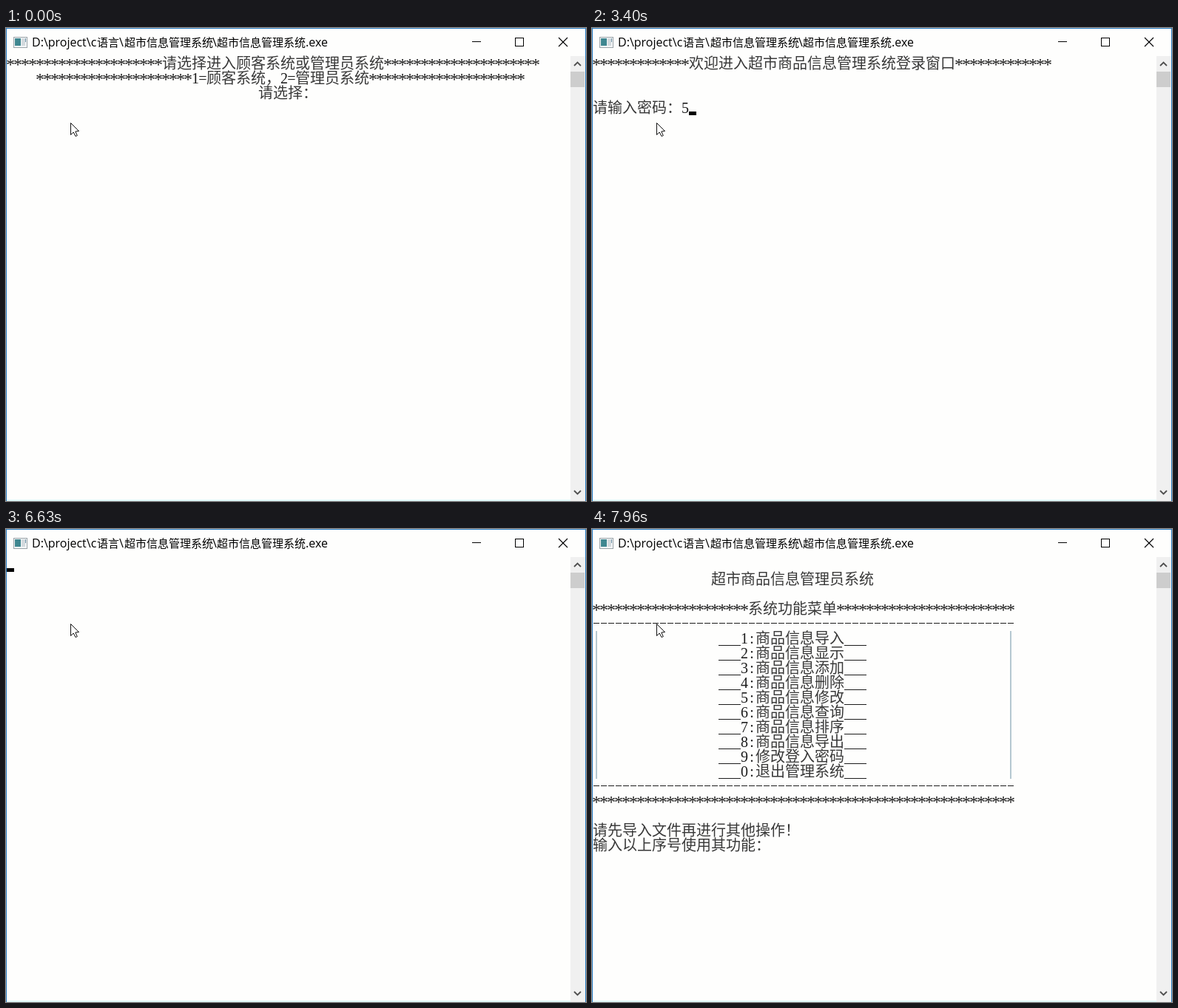
Recreate the animation shown at these times as an HTML page with a canvas. Size 784 px wide and 640 px high, loop 8000 ms.

```html
<!DOCTYPE html>
<html lang="zh-CN">
<head>
<meta charset="utf-8">
<style>
  html, body { margin: 0; width: 100%; height: 100%; overflow: hidden; background: #fefefd; }
  canvas { display: block; }
</style>
</head>
<body>
<canvas id="stage" width="784" height="640"></canvas>
<script>
const ctx = document.getElementById('stage').getContext('2d');
const LOOP = 8000, CELL = 10, ROW = 20, LEFT = 1, TOP = 38;
const CJK = '"Noto Sans CJK SC", "Noto Sans CJK", sans-serif';
const SERIF = '"Liberation Serif", serif';
const INK = '#1c1c1c', SOFT = '#383838';

const stars = n => '*'.repeat(n);
const pad = n => ' '.repeat(n);
const rule = '-'.repeat(57);
// Full-width punctuation
const COMMA = '\uff0c', COLON = '\uff1a', BANG = '\uff01';
const items = ['商品信息导入', '商品信息显示', '商品信息添加', '商品信息删除', '商品信息修改',
  '商品信息查询', '商品信息排序', '商品信息导出', '修改登入密码', '退出管理系统'];

// Each screen has its lines and the cell where input begins.
const screens = {
  choose: {
    lines: [
      stars(21) + '请选择进入顾客系统或管理员系统' + stars(21),
      pad(4) + stars(21) + '1=顾客系统' + COMMA + '2=管理员系统' + stars(21),
      pad(34) + '请选择' + COLON
    ], col: 0, row: 3
  },
  login: {
    lines: [stars(13) + '欢迎进入超市商品信息管理系统登录窗口' + stars(13), '', '', '请输入密码' + COLON],
    col: 12, row: 3
  },
  blank: { lines: [], col: 0, row: 0 },
  menu: {
    lines: [
      '', pad(16) + '超市商品信息管理员系统', '',
      stars(21) + '系统功能菜单' + stars(24), rule,
      ...items.map((s, i) => `|${pad(16)}___${(i + 1) % 10}:${s}___${pad(19)}|`),
      rule, stars(57), '', '请先导入文件再进行其他操作' + BANG, '输入以上序号使用其功能' + COLON
    ], col: 0, row: 20
  }
};

// [start ms, screen, typed text, cursor visible]
const steps = [
  [0, 'choose', '', 0], [530, 'choose', '', 1],
  [1000, 'choose', '2', 1], [1100, 'choose', '2', 0], [1630, 'choose', '2', 1],
  [2030, 'blank', '', 1],
  [2100, 'login', '', 1], [2130, 'login', '', 0], [2660, 'login', '', 1], [3230, 'login', '', 0],
  [3400, 'login', '5', 1],
  [3630, 'login', '52', 1], [3760, 'login', '52', 0],
  [3860, 'login', '522', 1], [4260, 'login', '522', 0],
  [4430, 'login', '5223', 1],
  [4660, 'login', '52231', 1], [4800, 'login', '52231', 0],
  [5000, 'login', '522314', 1], [5330, 'login', '522314', 0],
  [5500, 'login', '5223146', 1], [5860, 'login', '5223146', 0],
  [5930, 'login', '52231468', 1],
  [6130, 'login', '522314688', 1], [6360, 'login', '522314688', 0],
  [6630, 'blank', '', 1],
  [6700, 'blank', pad(7), 1], [6900, 'blank', pad(8), 1], [7130, 'blank', pad(9), 1],
  [7400, 'menu', '', 1], [7960, 'menu', '', 0]
];

function box(color, x, y, w, h) {
  ctx.fillStyle = color;
  ctx.fillRect(x, y, w, h);
}

function label(s, x, y, font, color = INK, align = 'left') {
  ctx.font = font;
  ctx.fillStyle = color;
  ctx.textAlign = align;
  ctx.fillText(s, x, y);
}

function path(points, color, width, fill) {
  ctx.beginPath();
  points.forEach(([x, y], i) => i ? ctx.lineTo(x, y) : ctx.moveTo(x, y));
  if (fill) {
    ctx.closePath();
    ctx.fillStyle = fill;
    ctx.fill();
  }
  ctx.strokeStyle = color;
  ctx.lineWidth = width;
  ctx.stroke();
}

const isWide = c => c > '\u2e7f';

// Wide characters take two cells, all others one.
function print(s, col, row) {
  let x = LEFT + col * CELL;
  const y = TOP + row * ROW;
  for (const c of s) {
    if (isWide(c)) label(c, x, y + 17, '300 20px ' + CJK, SOFT);
    else if (c === '-') box(INK, x + 1, y + 9, 8, 1);
    else if (c === '_') box(INK, x, y + 19, CELL, 1);
    else if (c === '|') box('#b5c8d1', x + 4, y, 2, ROW);
    else if (c === '*') label(c, x + 5, y + 19, '24px ' + SERIF, INK, 'center');
    else if (c !== ' ') label(c, x + 5, y + 17, '20px ' + SERIF, INK, 'center');
    x += isWide(c) ? 2 * CELL : CELL;
  }
}

function drawTitle() {
  box('#9aa3a8', 10, 12, 19, 15);
  box('#f4f6f7', 11, 13, 17, 13);
  box('#3f8790', 12, 14, 8, 10);
  box('#d3dade', 21, 14, 5, 10);
  box('#6f94a8', 26, 14, 1, 5);

  const latin = '16px "Open Sans", sans-serif', han = '15px ' + CJK;
  const name = '超市信息管理系统';
  [['D:\\project\\c', 35, latin], ['语言', 123, han], ['\\', 153, latin], [name, 160, han],
    ['\\', 279, latin], [name, 285, han], ['.exe', 405, latin]]
    .forEach(([s, x, font]) => label(s, x, 25, font, '#000'));

  box('#000', 630, 18, 12, 1);
  ctx.strokeStyle = '#000';
  ctx.lineWidth = 1;
  ctx.strokeRect(688.5, 13.5, 11, 11);
  path([[747, 13], [759, 25]], '#000', 1.1);
  path([[759, 13], [747, 25]], '#000', 1.1);
}

function drawFrame() {
  box('#f0f0f0', 763, 38, 20, 602);
  box('#cdcdcd', 763, 59, 19, 21);
  path([[768, 51], [772.5, 46.5], [777, 51]], '#505050', 1.8);
  path([[768, 626], [772.5, 630.5], [777, 626]], '#505050', 1.8);
  box('#e2fafa', 1, 638, 762, 2);
  const edge = '#2b7fc4';
  box(edge, 0, 0, 784, 1);
  box(edge, 0, 0, 1, 640);
  box(edge, 783, 0, 1, 640);
}

function drawPointer() {
  path([[87.5, 128.5], [87.5, 144.5], [91.2, 141], [94, 146.5], [96.3, 145.5],
    [93.8, 140], [98.5, 139.5], [87.5, 128.5]], '#111', 1, '#fff');
}

function draw(t) {
  const [, id, typed, on] = steps.findLast(s => s[0] <= t);
  const { lines, col, row } = screens[id];
  box('#fefefd', 0, 0, 784, 640);
  drawTitle();
  lines.forEach((s, i) => print(s, 0, i));
  print(typed, col, row);
  if (on) box('#000', LEFT + (col + typed.length) * CELL, TOP + row * ROW + 15, CELL, 5);
  drawFrame();
  drawPointer();
}

const start = performance.now();
function tick() {
  draw((performance.now() - start) % LOOP);
  requestAnimationFrame(tick);
}
tick();
</script>
</body>
</html>
```
